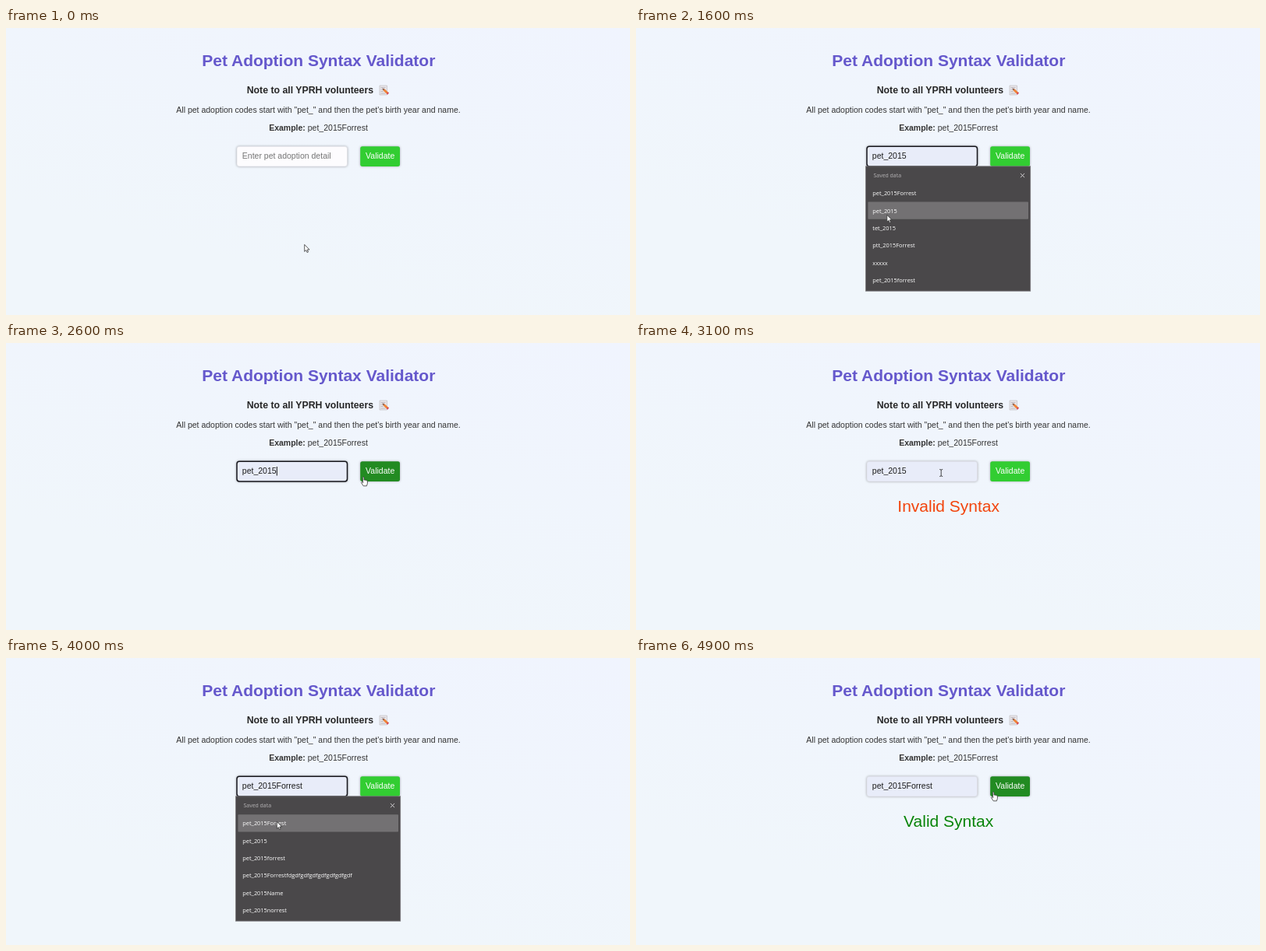
Write an HTML page that moves like this. It is 800 px wide and 369 px high and loops after 5000 ms.

```html
<!DOCTYPE html>
<html lang="en">
<head>
<meta charset="utf-8">
<title>Pet Adoption Syntax Validator</title>
<style>
  html, body { margin: 0; height: 100%; overflow: hidden; }
  body { background: linear-gradient(195deg, #f0f4fe, #f0f6fb 75%); }
  svg { display: block; width: 800px; height: 369px; }
  text { font: 10.51px Arial, "Liberation Sans", sans-serif; fill: #333; white-space: pre; }
  .mid { text-anchor: middle; }
  .bold { font-weight: bold; }
  #title { font-size: 21px; fill: #6558cc; }
  #note { font-size: 12.3px; fill: #262626; }
  #result { font-size: 21px; }
  #popup text { font: 7.4px "Open Sans", "Noto Sans", sans-serif; fill: #fff; }
  #popup .head { font-size: 6.95px; fill: #b5b3b5; }
  .shadow { filter: drop-shadow(0 0 1.5px rgba(0, 0, 0, .32)); }
  #cursor path { stroke-linejoin: round; stroke-linecap: round; }
</style>
</head>
<body>
<svg viewBox="0 0 800 369">
  <text id="title" class="mid bold" x="400.8" y="49">Pet Adoption Syntax Validator</text>
  <text id="note" class="bold" x="308.7" y="84.3">Note to all YPRH volunteers</text>
  <g id="memo">
    <path d="M479 74h9.5v12h-9.5z" fill="#e9e7ea" stroke="#b9b5bb" stroke-width=".6"/>
    <path d="M480.5 76.5h6M480.5 79h4M480.5 81.5h3M480.5 84h6" stroke="#a9a6b0" stroke-width=".7"/>
    <path d="M484.6 79.5l4.6 4.3" stroke="#ee8136" stroke-width="2.8"/>
    <path d="M488.8 83.4l1.3 1.2" stroke="#d8485a" stroke-width="2.8"/>
    <path d="M482.4 77.4l3.2.9-2 2.2z" fill="#8b5a44"/>
  </g>
  <text class="mid" x="400.5" y="109.2">All pet adoption codes start with "pet_" and then the pet's birth year and name.</text>
  <text class="mid" x="400.5" y="132"><tspan class="bold">Example:</tspan> pet_2015Forrest</text>

  <rect id="field" class="shadow" x="296" y="152.3" width="141.5" height="25.6" rx="3.2"/>
  <text id="value" x="302.8" y="168.2"></text>
  <rect id="caret" y="159" width="1" height="11.5" fill="#111"/>
  <rect id="button" class="shadow" x="454.2" y="152.3" width="50.8" height="25.6" rx="2.6"/>
  <text class="mid" x="479.7" y="168.2" style="fill:#fff">Validate</text>
  <text id="result" class="mid" x="400.7" y="216.8"></text>

  <g id="popup">
    <rect x="294.5" y="177.8" width="211.2" height="160.4" fill="#4a484a" stroke="#79777b" stroke-width=".8"/>
    <rect id="hover" x="297.4" width="205.6" height="22.2" rx="1" fill="#737173"/>
    <text class="head" x="304.5" y="192.4">Saved data</text>
    <path d="M492.9 187l5.2 5.2m0-5.2l-5.2 5.2" stroke="#dddbdd" stroke-width=".9"/>
    <g id="rows"></g>
  </g>

  <g id="cursor">
    <path id="arrow" d="M0 0V8.6L2 6.8 3.4 9.8 4.8 9.2 3.5 6.2H6z" fill="#fff" stroke="#333" stroke-width=".8"/>
    <path id="beam" d="M-1.6-4.5Q0-4.5 0-3.6Q0-4.5 1.6-4.5M0-3.6V3.6M-1.6 4.5Q0 4.5 0 3.6Q0 4.5 1.6 4.5" fill="none" stroke="#333" stroke-width=".9"/>
    <path id="hand" d="M0 1Q.8-.6 1.6 1V4.4Q2.6 3.6 3.2 4.6Q4.2 4 4.7 5Q6 4.6 6 6V8.8L5 12H.8L-2 7.6Q-1.6 6.2 0 7.6z" fill="#fff" stroke="#333" stroke-width=".8"/>
  </g>
</svg>
<script>
const LOOP = 5000, STEP = 100, ROW_TOP = 201.2, ROW_HEIGHT = 22.35;
const $ = id => document.getElementById(id);
const show = (id, on) => { $(id).style.display = on ? "" : "none"; };

const firstList = ["pet_2015Forrest", "pet_2015", "tet_2015", "ptt_2015Forrest", "xxxxx", "pet_2015forrest"];
const secondList = ["pet_2015Forrest", "pet_2015", "pet_2015forrest",
  "pet_2015Forrestfdg" + "dfg".repeat(6) + "df", "pet_2015Name", "pet_2015norrest"];

// Pointer keys: time, x, y
const path = [
  [0, 382.7, 278.8], [600, 382.7, 278.8], [700, 371, 225], [800, 357.7, 166.8], [1500, 357.7, 166.8],
  [1600, 321.8, 240.6], [1800, 321.8, 240.6], [2100, 411.4, 202], [2400, 457.4, 171.8], [2800, 457.4, 171.8],
  [3100, 391.2, 167], [3300, 357, 168], [3600, 346, 209], [3900, 346, 209], [4000, 347.3, 210.8],
  [4300, 347.3, 210.8], [4600, 457.4, 171.8], [LOOP, 457.4, 171.8]
];

function pointerAt(t) {
  const i = path.findIndex(key => key[0] > t);
  const [t0, x0, y0] = path[i - 1], [t1, x1, y1] = path[i];
  const k = (t - t0) / (t1 - t0);
  return [x0 + (x1 - x0) * k, y0 + (y1 - y0) * k];
}

function draw(t) {
  const within = (from, to) => t >= from && t < to;
  const [x, y] = pointerAt(t);
  const inBand = y > 152 && y < 178;
  const overField = inBand && x > 296 && x < 438;
  const overButton = inBand && x > 454 && x < 505;

  const open = within(1600, 1800) || within(3300, 4300);
  const list = t < 2800 ? firstList : secondList;
  const row = open ? Math.floor((y - ROW_TOP) / ROW_HEIGHT) : -1;
  show("popup", open);
  show("hover", row >= 0);
  $("hover").setAttribute("y", ROW_TOP + Math.max(row, 0) * ROW_HEIGHT);
  [...$("rows").children].forEach((label, i) => { label.textContent = list[i]; });

  const saved = t < 1800 ? "" : t < 4300 ? "pet_2015" : "pet_2015Forrest";
  const value = row >= 0 ? list[row] : saved;
  const focused = within(1600, 2700) || within(3300, 4700);
  $("value").textContent = value || "Enter pet adoption detail";
  $("value").style.fill = value ? "#1c1c1c" : "#757575";
  $("field").style.fill = value ? "#e8ecf9" : "#fdfcfe";
  $("field").style.stroke = focused ? "#16161c" : "#dcdce2";
  $("field").style.strokeWidth = focused ? 1.5 : .6;
  show("caret", focused && !open);
  $("caret").setAttribute("x", 303 + $("value").getComputedTextLength());

  $("button").style.fill = overButton ? "#228b22" : "#32cd32";
  const valid = t >= 4800;
  $("result").textContent = valid ? "Valid Syntax" : t >= 2800 ? "Invalid Syntax" : "";
  $("result").style.fill = valid ? "#088408" : "#f2440c";

  $("cursor").setAttribute("transform", `translate(${x} ${y})`);
  show("arrow", !overField && !overButton);
  show("beam", overField);
  show("hand", overButton);
}

firstList.forEach((_, i) => {
  const label = document.createElementNS($("rows").namespaceURI, "text");
  label.setAttribute("x", 303.3);
  label.setAttribute("y", 215.3 + i * ROW_HEIGHT);
  $("rows").append(label);
});

const start = performance.now();
function tick() {
  const t = (performance.now() - start) % LOOP;
  draw(Math.floor(t / STEP) * STEP);
  requestAnimationFrame(tick);
}
tick();
</script>
</body>
</html>
```
